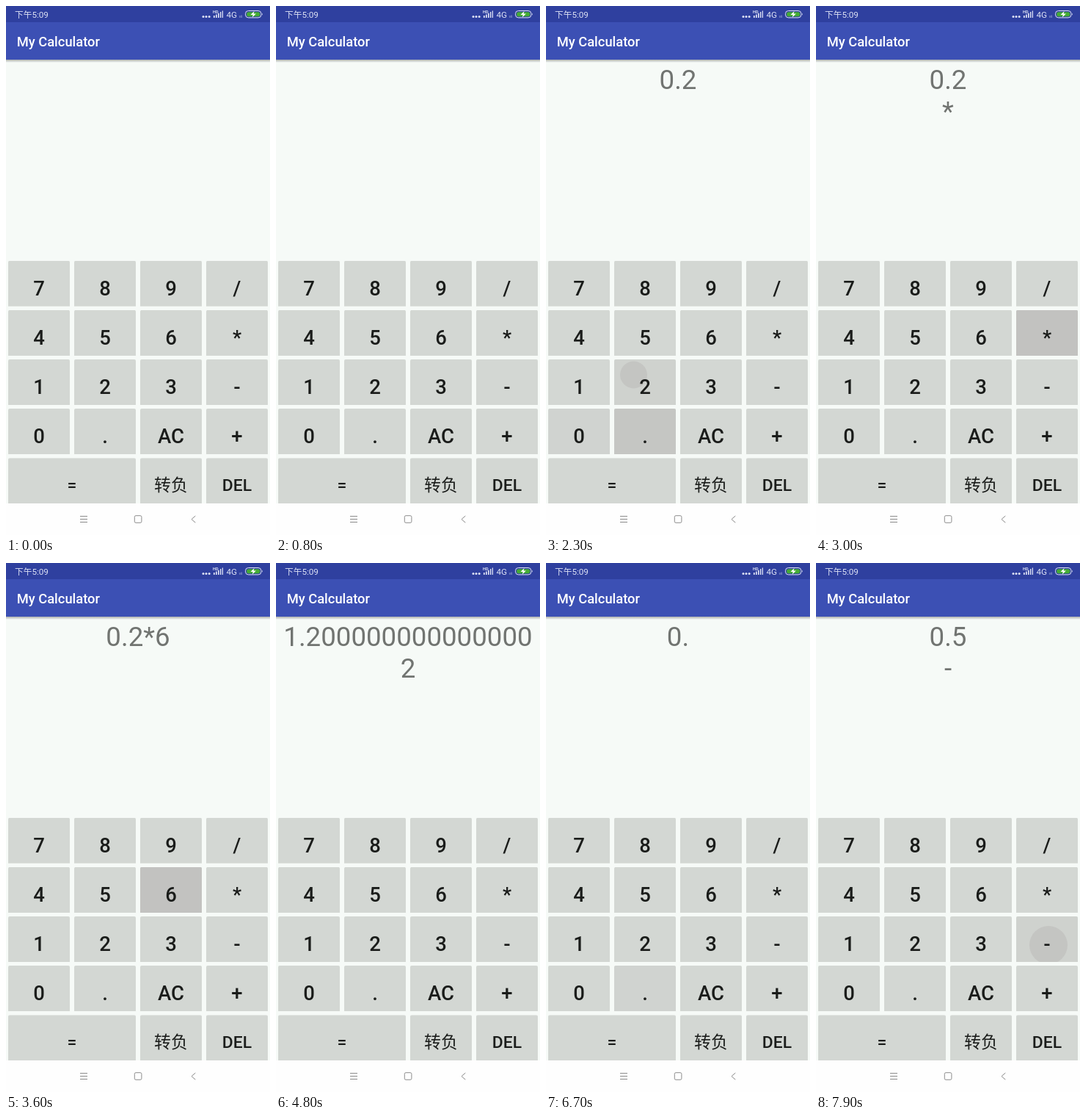
An HTML page for the animation above (8 s loop, 360 by 720 pixels).

```html
<!DOCTYPE html>
<html lang="en">
<head>
<meta charset="utf-8">
<title>My Calculator</title>
<style>
  html, body { margin: 0; width: 100%; height: 100%; overflow: hidden; background: #f6faf7; }
  #stage { display: block; width: 360px; height: 720px; font-family: Roboto, "Noto Sans CJK SC", "Noto Sans CJK", sans-serif; }
  .key { fill: #d3d7d3; }
  .tint, .ripple { fill: #c2c2c0; }
  .label { fill: #1a1c1a; font-weight: 500; text-anchor: middle; }
  .cjk { font-weight: 400; }
  .display { fill: #717471; font-size: 36.67px; text-anchor: middle; }
  .status { fill: #dde1f4; font-size: 11.7px; }
  .nav { fill: none; stroke: #8b8b8b; stroke-width: 1; }
</style>
</head>
<body>
<svg id="stage" viewBox="0 0 360 720">
  <defs>
    <linearGradient id="shade" x2="0" y2="1">
      <stop stop-color="#000" stop-opacity=".3"/>
      <stop offset="1" stop-color="#000" stop-opacity="0"/>
    </linearGradient>
  </defs>
  <rect width="360" height="720" fill="#f6faf7"/>
  <rect y="73" width="360" height="4" fill="url(#shade)"/>
  <rect width="360" height="73" fill="#3c50b4"/>
  <rect width="360" height="22" fill="#2f409f"/>
  <g class="status">
    <text x="12" y="16">下午5:09</text>
    <circle cx="269" cy="14.4" r="1.5"/><circle cx="273" cy="14.4" r="1.5"/><circle cx="277.2" cy="14.4" r="1.5"/>
    <text x="282" y="9.5" font-size="5.5" font-weight="700">HD</text>
    <path d="M283 13h1.7v3h-1.7zM286 11.5h1.7v4.5h-1.7zM289 9.8h1.7v6.2h-1.7zM292 8h1.4v8h-1.4zM294.8 6.5h1.2v9.5h-1.2z"/>
    <text x="300.5" y="16">4G</text>
    <path d="M318.5 13h1v3h-1zM320.7 12.5h1v3.5h-1z" opacity=".55"/>
    <rect x="326.5" y="6.5" width="21.5" height="9.4" rx="4" fill="none" stroke="#dde1f4"/>
    <rect x="328.2" y="8.2" width="18.1" height="6" rx="2.5" fill="#45ad35"/>
    <path d="M349.2 9.3q1.6 1.9 0 3.8z"/>
    <path d="M338.5 7l-5 5h3.2l-.8 3.6 5-5.2h-3.2z" fill="#fff"/>
  </g>
  <text x="14.7" y="55" font-size="18.33" font-weight="500" fill="#fff">My Calculator</text>
  <text class="display" id="line1" x="180" y="112.5"></text>
  <text class="display" id="line2" x="180" y="155.5"></text>
  <g id="keys"></g>
  <rect y="677" width="360" height="43" fill="#fefefe"/>
  <path class="nav" d="M101 694.5h10M101 698.5h10M101 702.5h10M258.3 694l-5.3 4.6 5.3 4.6"/>
  <rect class="nav" x="175.3" y="693.7" width="9.6" height="9.6" rx="1.8"/>
</svg>
<script>
const LOOP = 8000, STEP = 100, KEY_HEIGHT = 62;
const rows = [
  ['7', '8', '9', '/'],
  ['4', '5', '6', '*'],
  ['1', '2', '3', '-'],
  ['0', '.', 'AC', '+'],
  ['=', null, '转负', 'DEL']
];

// Each tap: time, key, ripple centre and first radius, then the two display lines.
const taps = [
  [1800, '0', 45, 580, 34, '0', ''],
  [2100, '.', 135, 580, 38, '0.', ''],
  [2300, '2', 119.5, 502, 18.5, '0.2', ''],
  [2900, '*', 315, 446, 30, '0.2', '*'],
  [3500, '6', 225, 446, 30, '0.2*6', ''],
  [3900, '=', 96, 646, 36, '1.200000000000000', '2'],
  [5300, 'AC', 225, 580, 30, '', ''],
  [6000, '0', 45, 580, 34, '0', ''],
  [6200, '.', 135, 580, 34, '0.', ''],
  [6900, '5', 135, 446, 40, '0.5', ''],
  [7900, '-', 317, 520, 26, '0.5', '-']
].map(([time, key, x, y, radius, line1, line2]) => ({ time, key, x, y, radius, line1, line2 }));

const byId = id => document.getElementById(id);

function add(parent, tag, attrs, text = '') {
  const node = document.createElementNS('http://www.w3.org/2000/svg', tag);
  for (const name in attrs) node.setAttribute(name, attrs[name]);
  node.textContent = text;
  return parent.appendChild(node);
}

const keys = {};
rows.forEach((row, r) => row.forEach((name, c) => {
  if (!name) return;
  const x = 3 + 90 * c, y = 346.8 + 67.1 * r;
  const width = name === '=' ? 174 : 84, large = r < 4;
  const box = add(byId('keys'), 'svg', { x, y, width, height: KEY_HEIGHT });
  const shape = { width, height: KEY_HEIGHT + 6, rx: 2 };
  add(box, 'rect', { class: 'key', ...shape });
  const tint = add(box, 'rect', { class: 'tint', ...shape });
  const ripple = add(box, 'circle', { class: 'ripple', opacity: 0.8 });
  add(box, 'text', {
    class: name === '转负' ? 'label cjk' : 'label',
    x: width / 2,
    y: large ? 46.9 : 44.8,
    'font-size': large ? 27.5 : 22.9
  }, name);
  keys[name] = { x, y, tint, ripple };
}));

function render(t) {
  for (const { tint, ripple } of Object.values(keys)) {
    tint.setAttribute('opacity', 0);
    ripple.setAttribute('r', 0);
  }
  let line1 = '', line2 = '';
  for (const tap of taps) {
    const age = t - tap.time;
    if (age < 0) break;
    ({ line1, line2 } = tap);
    const key = keys[tap.key];
    if (age < STEP) {
      key.tint.setAttribute('opacity', 0.25);
      key.ripple.setAttribute('cx', tap.x - key.x);
      key.ripple.setAttribute('cy', tap.y - key.y);
      key.ripple.setAttribute('r', tap.radius);
    } else if (age < 600) {
      key.tint.setAttribute('opacity', 1 - (age - STEP) / 500);
    }
  }
  byId('line1').textContent = line1;
  byId('line2').textContent = line2;
}

const start = performance.now();
function frame() {
  const t = (performance.now() - start) % LOOP;
  render(Math.floor(t / STEP) * STEP);
  requestAnimationFrame(frame);
}
frame();
</script>
</body>
</html>
```
